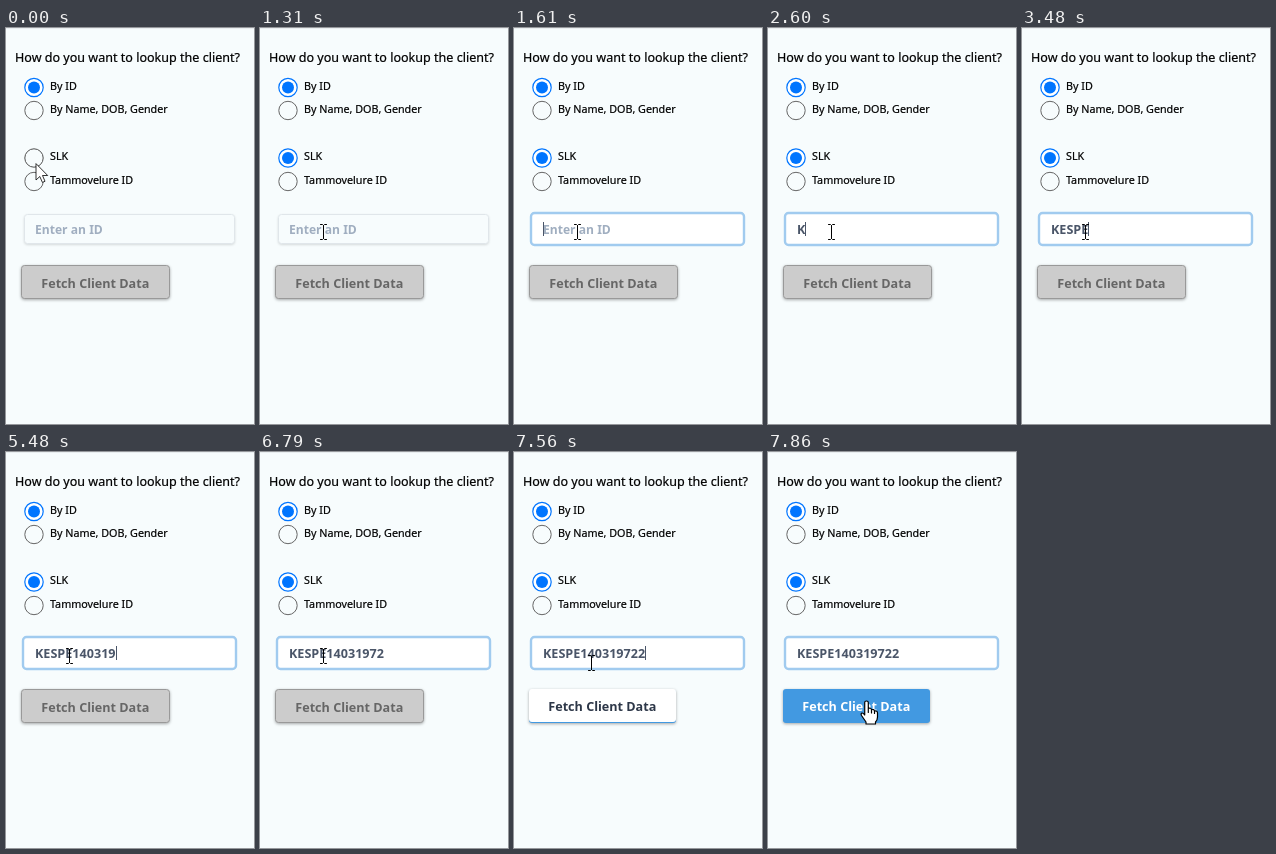
Animation, 248 px wide and 396 px high, one loop 7.99 s. Source, as an HTML page:

```html
<!DOCTYPE html>
<html lang="en">
<head>
<meta charset="utf-8">
<title>Client lookup</title>
<style>
html, body { margin: 0; width: 100%; height: 100%; overflow: hidden; background: #f7fcfd; }
svg { display: block; font: 12.55px "Noto Sans", sans-serif; }
.label { font-size: 10.75px; }
.heading, .label { stroke: #000; stroke-width: .2; }
.bold { font-weight: 700; font-size: 12.6px; }
.bold.placeholder { font-size: 12.1px; }
.radio circle { fill: none; stroke: #666; stroke-width: 1; }
.radio .dot { stroke: none; }
.radio.on circle { fill: #fff; stroke: var(--accent, #0075ff); stroke-width: 1.2; }
.radio.on .dot { fill: var(--accent, #0075ff); stroke: none; }
.soft { filter: drop-shadow(0 1px 1px #0002); }
#button { filter: drop-shadow(0 1.5px 1.5px #0005); }
#cursors path { stroke-linejoin: round; stroke-linecap: round; }
</style>
</head>
<body>
<svg width="248" height="396" viewBox="0 0 248 396">
  <rect width="248" height="396" fill="#f7fcfd"/>
  <rect width="248" height="1" fill="#e9eef0"/>
  <text class="heading" x="9" y="34">How do you want to lookup the client?</text>
  <g id="options"></g>

  <rect id="ring" x="17" y="185" width="213" height="32" rx="3.5" fill="#fff" stroke="#a1cbef" stroke-width="2.4"/>
  <rect id="field" class="soft" x="18.5" y="186.5" width="210" height="29" rx="3" fill="#f7fcfd" stroke="#e0e6ea"/>
  <text id="value" class="bold" x="29" y="206"></text>
  <rect id="caret" y="194" width="1" height="14" fill="#4a5568"/>

  <g id="button">
    <rect id="edge" x="15" y="238" width="147" height="33" rx="3" fill="#4299e1"/>
    <rect id="face" rx="3"/>
  </g>
  <text id="caption" class="bold">Fetch Client Data</text>

  <g id="cursors" stroke="#000" fill="#fff">
    <path id="arrow" stroke-width=".8" d="M0 0V16L3.8 12.5L6.4 18.4L9 17.3L6.5 11.5H11.3Z"/>
    <path id="beam" fill="none" stroke-width="1" d="M-3 -7.5H-1L0 -6.5L1 -7.5H3M0 -6.5V6.5M-3 7.5H-1L0 6.5L1 7.5H3"/>
    <path id="hand" stroke-width="1.2" d="M-1.8 1.5Q-1.8 0 0 0T1.8 1.5V7.5Q4.5 6.5 5 8.7Q7.6 8 8 10Q11 9.5 11 12V16Q11 19 9 21V23H-.5V21L-5 14.5Q-6 12.5 -4.5 12Q-3.3 11.8 -1.8 14ZM1.8 7.5V11.5M5 8.7V12M8 10V12.5"/>
  </g>
</svg>
<script>
const LOOP = 7990;
const ID = "KESPE140319722";
const KEYS = [2600, 2900, 3050, 3330, 3480, 3910, 3910, 4170, 4910, 5180, 5480, 5920, 6200, 7090];
const CARET = [[1610, 2150], [2600, 4780], [4910, 6790], [7090, 7710]];
const POINTER = [
  [0, "arrow", 30, 136], [1180, "arrow", 45, 168], [1310, "beam", 63.5, 204],
  [7410, "beam", 65.5, 207], [7560, "beam", 77.5, 211],
  [7710, "hand", 96, 244], [7860, "hand", 98.5, 249]
];
const BUTTON = {
  disabled: { x: 15.5, y: 237.5, w: 148, h: 33, fill: "#ccc", stroke: "#999", color: "#666", tx: 35.3, ty: 260 },
  ready: { x: 15, y: 237, w: 147, h: 33, fill: "#fff", stroke: "none", color: "#2d3748", tx: 34.3, ty: 259 },
  hover: { x: 15, y: 237, w: 147, h: 33, fill: "#4299e1", stroke: "none", color: "#fff", tx: 34.3, ty: 259 }
};

const $ = id => document.getElementById(id);
const set = (el, attrs) => { for (const k in attrs) el.setAttribute(k, attrs[k]); };
const show = (el, on) => el.style.display = on ? "" : "none";

$("options").innerHTML = [
  ["By ID", 59.5, 62, "on"], ["By Name, DOB, Gender", 82.5, 85, ""],
  ["SLK", 130, 132, ""], ["Tammovelure ID", 153.5, 156, ""]
].map(([text, y, baseline, state]) => `<g class="radio ${state}">
  <circle cx="28" cy="${y}" r="9.2"/><circle class="dot" cx="28" cy="${y}" r="6"/></g>
  <text class="label" x="44" y="${baseline}">${text}</text>`).join("");
const slk = document.querySelectorAll(".radio")[2];

function render(t) {
  slk.classList.toggle("on", t >= 1030);
  slk.style.setProperty("--accent", t < 1180 ? "#005cc8" : "#0075ff");
  slk.firstElementChild.style.stroke = t < 880 ? "#4f4f4f" : t < 1030 ? "#8d8d8d" : "";

  const focused = t >= 1610;
  show($("ring"), focused);
  show($("field"), !focused);
  const typed = ID.slice(0, KEYS.filter(k => t >= k).length);
  const value = $("value");
  value.textContent = typed || "Enter an ID";
  value.classList.toggle("placeholder", !typed);
  set(value, { fill: typed ? "#4a5568" : "#a0aec0" });
  show($("caret"), CARET.some(([from, to]) => t >= from && t < to));
  set($("caret"), { x: Math.round(29 + (typed ? value.getComputedTextLength() : 0)) });

  const b = BUTTON[t < 7090 ? "disabled" : t < 7710 ? "ready" : "hover"];
  show($("edge"), t >= 7090);
  set($("face"), { x: b.x, y: b.y, width: b.w, height: b.h, fill: b.fill, stroke: b.stroke });
  set($("caption"), { x: b.tx, y: b.ty, fill: b.color });

  const [, shape, x, y] = POINTER.findLast(p => t >= p[0]);
  for (const el of $("cursors").children) show(el, el.id === shape);
  set($(shape), { transform: `translate(${x} ${y})` });
}

const start = performance.now();
function tick() {
  render((performance.now() - start) % LOOP);
  requestAnimationFrame(tick);
}
tick();
</script>
</body>
</html>
```
